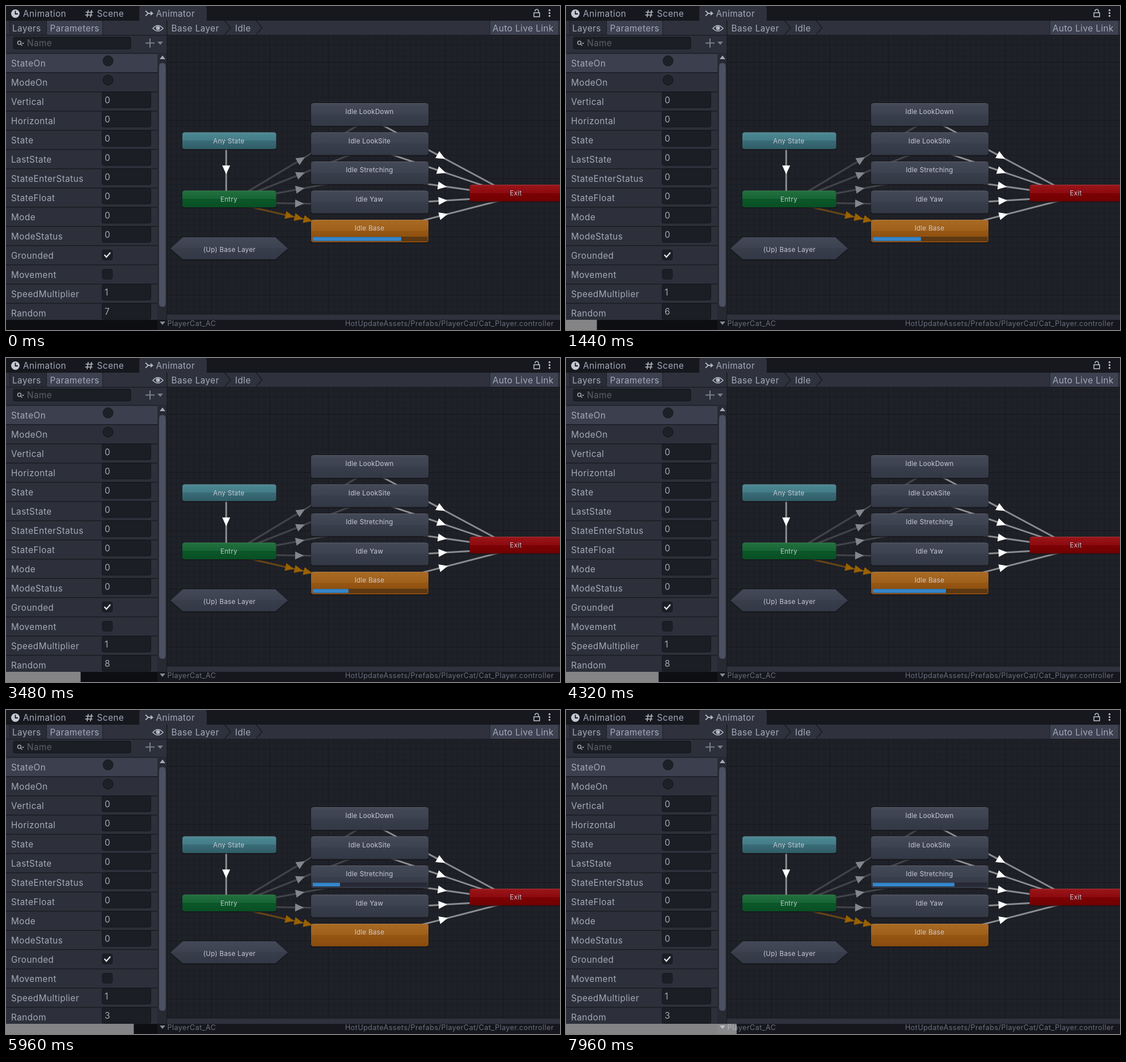
Recreate the animation shown at these times as an HTML page. Size 977 px wide and 573 px high, loop 8000 ms.

```html
<!DOCTYPE html>
<html lang="en">
<head>
<meta charset="utf-8">
<title>Animator panel</title>
<style>
  html, body { margin: 0; height: 100%; overflow: hidden; background: #1e2027; }
  svg { display: block; width: 100vw; height: 100vh; }
  text { font: 15.3px Inter, sans-serif; letter-spacing: .45px; fill: #a4a9ba; }
  .node { font-size: 11.7px; letter-spacing: .25px; fill: #c5c9d6; text-anchor: middle; }
  .foot { font-size: 12.6px; fill: #6c707d; }
  .hint { fill: #5c606d; }
</style>
</head>
<body>
<svg id="stage" viewBox="0 0 977 573" preserveAspectRatio="none"></svg>
<script>
const LOOP = 8000, STEP = 40;
const stage = document.getElementById('stage');

const rect = (x, y, w, h, fill, more = '') =>
  `<rect x="${x}" y="${y}" width="${w}" height="${h}" fill="${fill}" ${more}/>`;
const text = (x, y, s, more = '') => `<text x="${x}" y="${y}" ${more}>${s}</text>`;
const path = (d, stroke, width = 1.5, fill = 'none') =>
  `<path d="${d}" fill="${fill}" stroke="${stroke}" stroke-width="${width}"/>`;
const shape = (d, fill) => `<path d="${d}" fill="${fill}"/>`;
const field = (x, y, w, h) =>
  rect(x, y, w, h, '#1c1e25', 'rx="3" stroke="#13151a"');
const gradient = (id, a, b, c, d) =>
  `<linearGradient id="${id}" x2="0" y2="1"><stop stop-color="${a}"/><stop offset=".5" stop-color="${b}"/>` +
  `<stop offset=".5" stop-color="${c}"/><stop offset="1" stop-color="${d}"/></linearGradient>`;

const defs = `<defs>
  ${gradient('slate', '#444958', '#3d4251', '#393e4c', '#333845')}
  ${gradient('teal', '#4d8994', '#437b86', '#396c77', '#305c66')}
  ${gradient('green', '#21713e', '#176434', '#0b5728', '#095025')}
  ${gradient('red', '#9b161b', '#8c0a0e', '#7c0205', '#720001')}
  ${gradient('orange', '#a96a24', '#9e5f19', '#965613', '#894c0e')}
  <pattern id="minor" x="362" y="99" width="10.3" height="10.3" patternUnits="userSpaceOnUse">
    <path d="M0 .5H10.3M.5 0V10.3" stroke="#1a1c22"/></pattern>
  <pattern id="major" x="362" y="99" width="103" height="103" patternUnits="userSpaceOnUse">
    <path d="M0 .5H103M.5 0V103" stroke="#15171c"/></pattern>
</defs>`;

// Graph
const ENTRY = [394, 341], ANY = [394, 238], EXIT = [899, 331];
const states = ['Idle LookDown', 'Idle LookSite', 'Idle Stretching', 'Idle Yaw', 'Idle Base']
  .map((name, i) => ({ name, top: 172 + 51.5 * i, at: [641, 192 + 51.4 * i] }));
const BASE = states[4];

// Links run beside the line between two node centres.
function link(a, b) {
  const dx = b[0] - a[0], dy = b[1] - a[1], len = Math.hypot(dx, dy);
  const x = a[0] - dy / len * 5.7, y = a[1] + dx / len * 5.7;
  return { x, y, dx, dy, len, angle: Math.atan2(dy, dx) * 180 / Math.PI };
}
function edge(a, b, line, head, shifts = [0]) {
  const { x, y, dx, dy, len, angle } = link(a, b);
  const heads = shifts.map(s => {
    const k = .5 + s / len;
    return `<path d="M-7.5 -7L8 0L-7.5 7Z" fill="${head}" transform="translate(${x + dx * k} ${y + dy * k}) rotate(${angle})"/>`;
  });
  return { line: path(`M${x} ${y}l${dx} ${dy}`, line, 3), heads: heads.join('') };
}
function node(x, y, w, h, fill, name, cx = x + w / 2, ty = y + 19) {
  return rect(x - .5, y + 1, w + 1, h + 1, '#14161b', 'rx="4" opacity=".7"') +
    rect(x, y, w, h, `url(#${fill})`, 'rx="4"') +
    path(`M${x + 4} ${y + .5}h${w - 8}`, '#ffffff22', 1) +
    text(cx, ty, name, 'class="node"');
}

const edges = [
  edge(ANY, ENTRY, '#8c8d90', '#fff'),
  ...states.map(s => s === BASE
    ? edge(ENTRY, s.at, '#684711', '#996100', [-16.5, 0, 16.5])
    : edge(ENTRY, s.at, '#43454a', '#85868a')),
  ...states.map(s => edge(s.at, EXIT, '#8c8d90', '#fff'))
];

const graph = rect(284, 52, 693, 495, '#1f2128') + rect(284, 52, 693, 495, 'url(#minor)') +
  rect(284, 52, 693, 495, 'url(#major)') +
  edges.map(e => e.line).join('') +
  '<path id="flow" fill="none" stroke="#3d8fd1" stroke-width="3.5"/>' +
  edges.map(e => e.heads).join('') +
  node(311, 223.5, 165.5, 29.5, 'teal', 'Any State', 393) +
  node(311, 326.5, 165.5, 29.5, 'green', 'Entry', 393) +
  node(818, 316, 162, 29.5, 'red', 'Exit') +
  states.map(s => node(538, s.top, 207, 40, s === BASE ? 'orange' : 'slate', s.name, 641)).join('') +
  shape('M289 430L312 409.5H475L498 430L475 450H312Z', '#14161b') +
  shape('M290 429L312 409H475L497 429L475 448H312Z', 'url(#slate)') +
  text(394, 435, '(Up) Base Layer', 'class="node"') +
  `<g id="baseBar">${rect(541, 408, 202.5, 8, '#5d3812')}${rect(541, 408.5, 0, 7, '#3386cb')}</g>` +
  `<g id="stretchBar">${rect(541, 305, 202.5, 7.5, '#272a35')}${rect(541, 305.5, 0, 6.5, '#3386cb')}</g>`;

// Parameter list
const params = [['StateOn', 'o'], ['ModeOn', 'o'], ['Vertical', '0'], ['Horizontal', '0'], ['State', '0'],
  ['LastState', '0'], ['StateEnterStatus', '0'], ['StateFloat', '0'], ['Mode', '0'], ['ModeStatus', '0'],
  ['Grounded', 'on'], ['Movement', 'off'], ['SpeedMultiplier', '1'], ['Random', '7']];

function row([name, value], i) {
  const y = 83 + 34 * i;
  let s = rect(0, y, 267, 34, i ? '#2d303a' : '#3c404e') + rect(0, y, 267, 1.5, '#1a1c22') +
    text(9, y + 23.5, name);
  if (value === 'o') s += `<circle cx="180" cy="${y + 14}" r="9" fill="#1e2027" stroke="#13151a"/>`;
  else if (value[0] === 'o') {
    s += field(170, y + 8.5, 17.5, 17.5);
    if (value === 'on') s += path(`M173.5 ${y + 17}l3.6 4l7 -8`, '#dfe2ea', 2.4);
  } else s += field(169.5, y + 71 - 71 + 3 - 2, 86, 28) +
    text(174, y + 88 - 83 + 83 - 66 - .5 - 1, value, name === 'Random' ? 'id="random"' : '');
  return s;
}

const panel = rect(0, 52, 284, 503, '#2d303a') + field(13, 55, 207, 21) +
  '<circle cx="23.5" cy="65" r="3" fill="none" stroke="#a4a9ba" stroke-width="1.5"/>' +
  path('M25.7 67.2l3 3', '#a4a9ba') + shape('M28 65h4l-2 2.5z', '#a4a9ba') +
  text(37, 71, 'Name', 'class="hint"') +
  path('M246 65.5h16M254 57.5v16', '#7c808d', 2) + shape('M267 63h10l-5 5.5z', '#7c808d') +
  params.map(row).join('') +
  rect(267, 83, 17, 472, '#272a33') + rect(270, 101, 11.5, 431, '#4c5060', 'rx="5"');

// Tabs and toolbar
const header = rect(0, 0, 977, 26, '#16181d') +
  shape('M235 26V4q0 -4 4 -4H350q4 0 4 4V26z', '#2f323d') +
  '<circle cx="16.5" cy="13.5" r="7.5" fill="#c3c7d2"/>' + path('M16.5 8.5V14H21', '#16181d', 1.8) +
  text(30, 19, 'Animation') +
  path('M145 7l-2 13M151 7l-2 13M140.5 11h13M139.5 16h13', '#b5b9c5', 1.6) +
  text(160.5, 19, 'Scene') +
  path('M246 8.5l5 4.5l-5 4.5M250 13h8M255 10l3.5 3l-3.5 3', '#b5b9c5', 1.8) +
  text(264.5, 19, 'Animator') +
  rect(931, 12, 10, 7, 'none', 'stroke="#b5b9c5" stroke-width="1.6"') +
  path('M933 9.5V9q0 -3 3 -3t3 3v3', '#b5b9c5', 1.6) +
  [7.5, 12.5, 17.5].map(y => `<circle cx="958.5" cy="${y}" r="1.7" fill="#b5b9c5"/>`).join('') +
  rect(0, 26, 977, 26, '#2f323d') + rect(0, 51, 977, 1.2, '#191b21') +
  rect(6, 26, 65, 25, '#2a2d37') + rect(72, 26, 98, 25, '#3d4150') +
  path('M6.5 26v25M71.5 26v25M170.5 26v25', '#1c1e25', 1) +
  text(11, 44.5, 'Layers') + text(77.5, 44.5, 'Parameters') +
  path('M259 39.5Q268 29.5 277 39.5Q268 49 259 39.5Z', '#b5b9c5', 1.6) +
  '<circle cx="268" cy="39" r="3.5" fill="#b5b9c5"/>' +
  text(291.5, 44.5, 'Base Layer') + text(404, 44.5, 'Idle') +
  path('M385.5 26l10.5 12.5l-10.5 12.5M441 26l10.5 12.5l-10.5 12.5', '#1a1c22', 1.6) +
  rect(853, 26, 121, 25, '#3d4150') + path('M853 26v25M974.5 26v25', '#1c1e25', 1) +
  text(858, 44.5, 'Auto Live Link') + rect(283, 26, 1.5, 529, '#191b21');

const footer = rect(284, 546, 693, 9, '#2f323d') + rect(0, 555, 977, 18, '#15171c') +
  rect(0, 555.5, 267, 17.5, '#0d0e12') +
  shape('M271 94l5 -6.5l5 6.5z', '#a4a9ba') + shape('M271 558l5 6l5 -6z', '#858997') +
  text(284.5, 566, 'PlayerCat_AC', 'class="foot"') +
  text(598, 566, 'HotUpdateAssets/Prefabs/PlayerCat/Cat_Player.controller', 'class="foot"') +
  '<rect id="seek" y="555" height="18" fill="#fff" opacity=".49"/>';

stage.innerHTML = defs + graph + panel + header + footer;

const $ = id => document.getElementById(id);
const flow = $('flow'), seek = $('seek'), random = $('random');
const baseBar = $('baseBar'), stretchBar = $('stretchBar');
const exitLink = link(BASE.at, EXIT);

// Each blend starts the next state while the old one plays out.
const BLEND = 250, BASE_SPEED = .0787, STRETCH_SPEED = .048;
const blends = [{ at: 360, pick: 6 }, { at: 2680, pick: 8 }, { at: 5020, pick: 3 }];

function setBar(bar, width) {
  bar.style.display = width > 0 ? '' : 'none';
  bar.lastChild.setAttribute('width', Math.max(0, Math.min(202, width)));
}

function draw(t) {
  let pick = 7, began = -1982, progress = 0;
  for (const b of blends) {
    const k = (t - b.at) / BLEND;
    if (k >= 0) pick = b.pick;
    if (k >= 1) began = b.at;
    else if (k > 0) progress = k;
  }
  random.textContent = pick;
  setBar(baseBar, began === blends[2].at ? 0 : (t - began) * BASE_SPEED);
  setBar(stretchBar, t >= 5060 ? (t - 4960) * STRETCH_SPEED : 0);
  const { x, y, dx, dy } = exitLink;
  flow.setAttribute('d', progress ? `M${x} ${y}l${dx * progress} ${dy * progress}` : '');
  seek.setAttribute('width', t * 977 / 25840);
}

const start = performance.now();
function tick() {
  const t = (performance.now() - start) % LOOP;
  draw(Math.floor(t / STEP) * STEP);
  requestAnimationFrame(tick);
}
tick();
</script>
</body>
</html>
```
